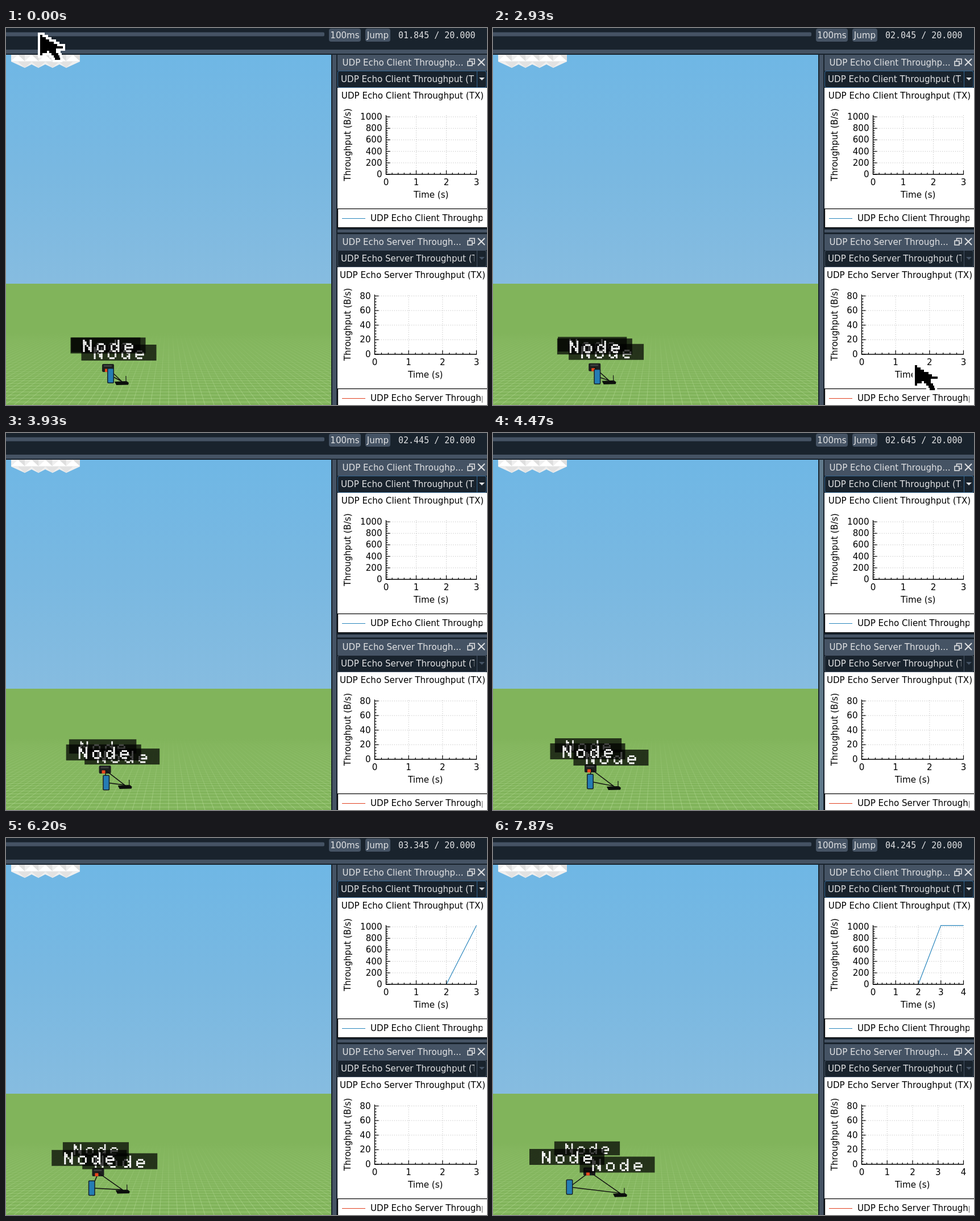
Animation of 846x662 px, one loop 8000 ms. Source, as an HTML page with a canvas:

```html
<!DOCTYPE html>
<html>
<head>
<meta charset="utf-8">
<style>
html, body { margin: 0; width: 100%; height: 100%; overflow: hidden; background: #19232d; }
canvas { display: block; }
</style>
</head>
<body>
<canvas id="stage" width="846" height="662"></canvas>
<script>
const g = document.getElementById('stage').getContext('2d');
const DARK = '#19232d', GREY = '#455364', LIGHT = '#e0e1e3';
const SANS = '15.1px "DejaVu Sans", sans-serif';
const MONO = '15px "DejaVu Sans Mono", monospace';

// [ms, simulation ticks elapsed]
const STEPS = [[0, 0], [2270, 1], [2600, 2], [3000, 3], [3330, 4], [3600, 5], [3930, 6],
  [4200, 7], [4470, 8], [4600, 9], [4800, 10], [5070, 11], [5270, 12], [5530, 12],
  [5670, 13], [5870, 14], [6200, 15], [6400, 16], [6600, 17], [6800, 18],
  [7070, 20], [7200, 21], [7270, 22], [7670, 23], [7870, 24]];

// [ms, phone x, y, box x, y, router x, y]
const POSES = [
  [2270, 184, 610.5, 180, 598, 203, 622],
  [3330, 182, 616, 177.5, 594, 205, 618],
  [4470, 171, 612, 172, 590, 212, 622],
  [5530, 159.5, 614, 168, 588.5, 200, 617.5],
  [6800, 143, 615.5, 157.5, 587.5, 209, 621.5],
  [7870, 134.5, 613, 170, 586.5, 223, 625.5]];

const CURSOR_PATH = [[2800, 758, 640], [3330, 693, 447], [3620, 650, 664]];
const CURSOR = [[0, 1], [0, 2.5], [0, 4], [0, 6], [0, 7.5], [0, 10], [0, 7],
  [0, 3, 4, 7], [0, 1, 5, 8], [6, 8.5], [6.5, 8.8]];

const GLYPHS = {
  N: [17, 25, 25, 21, 19, 19, 17],
  o: [0, 0, 14, 17, 17, 17, 14],
  d: [1, 1, 13, 19, 17, 19, 13],
  e: [0, 0, 14, 17, 31, 16, 14]
};

function rect(color, x, y, w, h) {
  g.fillStyle = color;
  g.fillRect(x, y, w, h);
}

function round(color, x, y, w, h, r) {
  g.fillStyle = color;
  g.beginPath();
  g.roundRect(x, y, w, h, r);
  g.fill();
}

function poly(color, ...p) {
  g.fillStyle = color;
  g.beginPath();
  for (let i = 0; i < p.length; i += 2) g.lineTo(p[i], p[i + 1]);
  g.fill();
}

function path(color, width, ...p) {
  g.strokeStyle = color;
  g.lineWidth = width;
  g.beginPath();
  for (let i = 0; i < p.length; i += 2) g.lineTo(p[i], p[i + 1]);
  g.stroke();
}

function text(s, x, y, color = '#000', align = 'left', font = SANS) {
  g.font = font;
  g.fillStyle = color;
  g.textAlign = align;
  g.fillText(s, x, y);
}

function clipped(x, y, w, h, draw) {
  g.save();
  g.beginPath();
  g.rect(x, y, w, h);
  g.clip();
  draw();
  g.restore();
}

// Linear interpolation through rows of [ms, ...values]
function at(rows, t) {
  if (t <= rows[0][0]) return rows[0].slice(1);
  const i = rows.findIndex(r => r[0] >= t);
  if (i < 0) return rows[rows.length - 1].slice(1);
  const a = rows[i - 1], b = rows[i], k = (t - a[0]) / (b[0] - a[0]);
  return a.slice(1).map((v, j) => v + (b[j + 1] - v) * k);
}

function topBar(ticks) {
  rect(DARK, 0, 0, 846, 662);
  round(GREY, -5, 7.5, 565, 7, 2);
  round(GREY, 568, 1, 56, 23, 4);
  round(GREY, 632, 1, 44, 23, 4);
  text('100ms', 596, 17.5, LIGHT, 'center');
  text('Jump', 654, 17.5, LIGHT, 'center');
  const clock = (1.845 + ticks / 10).toFixed(3).padStart(6, '0');
  text(clock + ' / 20.000', 690, 18, LIGHT, 'left', MONO);
  rect(GREY, 0, 38, 846, 7);
}

function landscape() {
  const sky = g.createLinearGradient(0, 47, 0, 449);
  sky.addColorStop(0, '#6fb7e5');
  sky.addColorStop(0.5, '#79b8e1');
  sky.addColorStop(1, '#86bce0');
  rect(sky, 0, 47, 572, 402);
  rect('#81b45b', 0, 449, 572, 213);

  const glow = g.createLinearGradient(0, 535, 0, 662);
  glow.addColorStop(0, 'rgba(190,225,160,0)');
  glow.addColorStop(1, 'rgba(190,225,160,.5)');
  for (let i = -60; i <= 60; i++) {
    path(glow, 1, 286 + i * 6.5, 535, 286 + i * 16, 662);
  }
  for (let n = 30; n < 80; n++) {
    const y = 449 + 6650 / n;
    path(glow, 1, 0, y, 572, y);
  }

  poly('#efefef', 9, 47, 9, 59, 33, 70, 45, 64, 57, 70, 69, 64, 82, 70,
    94, 64, 106, 70, 130, 59, 130, 47);
  for (let i = 0; i < 5; i++) {
    const x = 9 + i * 24.2;
    poly('#ffffff', x, 58, x + 12, 47, x + 24, 58);
    poly('#dedede', x + 12, 47, x + 24, 58, x + 24, 47);
    if (i < 4) poly('#e2e2e2', x + 12, 59, x + 36, 59, x + 24, 70);
  }
}

function label(x, y, w) {
  const s = w / 132, c = 3.05 * s;
  rect('rgba(0,0,0,.72)', x - w / 2, y - 14 * s, w, 28 * s);
  g.fillStyle = '#fff';
  [...'Node'].forEach((ch, i) => GLYPHS[ch].forEach((bits, row) => {
    for (let b = 0; b < 5; b++) {
      if (bits >> (4 - b) & 1) {
        g.fillRect(x + (i * 24.3 - 44) * s + b * c, y - 10 * s + row * c, c, c);
      }
    }
  }));
}

function nodes(t) {
  const [ax, ay, bx, by, cx, cy] = at(POSES, t);
  round('#1c1f1e', bx - 11, by - 8, 21, 14, 2);
  rect('#3a3d3c', bx - 8, by - 6, 14, 3);
  path('#111', 1.5, ax, ay, bx, by, cx, cy - 2, ax, ay);
  rect('#e8481c', bx - 6, by + 0.5, 6, 5.5);
  round('#17222a', ax - 6, ay - 13.5, 12, 27, 2);
  round('#257cb4', ax - 4.5, ay - 12, 9, 24, 1);
  poly('#0c0f0c', cx - 12, cy - 1, cx + 9, cy - 2, cx + 13, cy + 1, cx + 12, cy + 4.5, cx - 9, cy + 5);
  path('#1a1f18', 1.3, cx + 8, cy, cx + 8, cy - 11);
  label(bx - 4.5, by - 41.5, 115 + (by - 586) * 0.58);
  label(cx - 4.5, cy - 52, 132);
  label(ax - 4.5, ay - 53, 132);
}

function dock(top, name, short, border, arrow) {
  rect(GREY, 583, top, 263, 28);
  text(short, 591.5, top + 18.5, LIGHT);
  g.strokeStyle = LIGHT;
  g.lineWidth = 1.6;
  g.strokeRect(815.5, top + 7.5, 8.5, 8.5);
  rect(GREY, 811, top + 11, 9, 9);
  g.strokeRect(812, top + 11.5, 8, 7.5);
  path(LIGHT, 2, 830, top + 7, 842, top + 19);
  path(LIGHT, 2, 842, top + 7, 830, top + 19);

  round(border, 583, top + 28, 262.5, 30, 4);
  round(DARK, 584, top + 29, 260.5, 28, 3);
  clipped(584, top + 28, 240, 30, () => text(name, 589, top + 48, LIGHT));
  rect(border, 828, top + 29, 1, 28);
  poly(arrow, 832, top + 40, 842, top + 40, 837, top + 45);
}

function chart(o, xMax) {
  const { left, base, top, unit, step, yMax } = o, right = 828;
  const px = v => left + v * (right - 0.5 - left) / xMax;
  const py = v => base - v * unit;
  rect('#fff', 583, o.white, 263, o.legend - o.white + 34);
  text(o.name, 715, o.white + 19, '#000', 'center');

  g.setLineDash([1.2, 2.6]);
  for (let i = 1; i <= xMax; i++) path('#bdbdbd', 1, px(i), base, px(i), top);
  for (let v = step; v <= yMax; v += step) path('#bdbdbd', 1, left, py(v), right, py(v));
  g.setLineDash([]);

  if (o.line) {
    const p = [px(2), base, px(3), py(1024)];
    if (xMax > 3) p.push(px(4), py(1024));
    path(o.color, 1.2, ...p);
  }

  path('#000', 1.3, left, top, left, base, right, base);
  for (let i = 0; i <= xMax * 5; i++) {
    path('#000', 1.2, px(i / 5), base, px(i / 5), base - (i % 5 ? 3 : 7));
    if (i % 5 === 0) text(i / 5, px(i / 5), base + 18.5, '#000', 'center');
  }
  for (let i = 0; i <= yMax / step * 5; i++) {
    const y = py(i * step / 5);
    path('#000', 1.2, left, y, left + (i % 5 ? 3 : 7), y);
    if (i % 5 === 0) text(i * step / 5, left - 7, y + 5, '#000', 'right');
  }
  text('Time (s)', (left + right) / 2 - 0.5, base + 41, '#000', 'center');
  g.save();
  g.translate(605.5, (top + base) / 2);
  g.rotate(-Math.PI / 2);
  text('Throughput (B/s)', 0, 0, '#000', 'center');
  g.restore();

  g.strokeStyle = '#000';
  g.lineWidth = 1.2;
  g.strokeRect(583.5, o.legend + 0.5, 270, 33);
  path(o.color, 1.2, 591, o.legend + 17.5, 632, o.legend + 17.5);
  clipped(584, o.legend, 254, 34, () => text(o.name, 641, o.legend + 21.5));
}

function cursor(x, y) {
  for (const edge of [4, 0]) {
    CURSOR.forEach((row, i) => {
      for (let k = 0; k < row.length; k += 2) {
        rect(edge ? '#fff' : '#000', x + row[k] * 4 - edge, y + i * 4 - edge,
          (row[k + 1] - row[k]) * 4 + edge * 2, 4 + edge * 2);
      }
    });
  }
}

function draw(t) {
  const [moved, ticks] = STEPS.filter(s => s[0] <= t).pop();
  const hover = t >= 4470 && t < 4600 || t >= 4000 && t < 4130;
  const xMax = t < 7470 ? 3 : 4;
  const client = 'UDP Echo Client Throughput (TX)';
  const server = 'UDP Echo Server Throughput (TX)';

  topBar(ticks);
  clipped(0, 47, 572, 615, () => {
    landscape();
    nodes(moved);
  });
  rect(hover ? '#60798b' : GREY, 574, 47, 7, 615);

  dock(47, client, 'UDP Echo Client Throughp...', '#346792', LIGHT);
  chart({ name: client, white: 105, legend: 317, left: 668.5, base: 257, top: 153,
    unit: 0.101, step: 200, yMax: 1000, color: '#2a86bd', line: t >= 5270 }, xMax);
  rect(GREY, 583, 354, 263, 5);
  dock(362, server, 'UDP Echo Server Through...', GREY, GREY);
  chart({ name: server, white: 420, legend: 633, left: 648.5, base: 573, top: 468,
    unit: 1.281, step: 20, yMax: 80, color: '#e2401f' }, xMax);

  if (t < 70) cursor(60, 12);
  else if (t >= 2800 && t < 3600) cursor(...at(CURSOR_PATH, t).map(Math.round));
}

function loop() {
  draw(performance.now() % 8000);
  requestAnimationFrame(loop);
}
loop();
</script>
</body>
</html>
```
